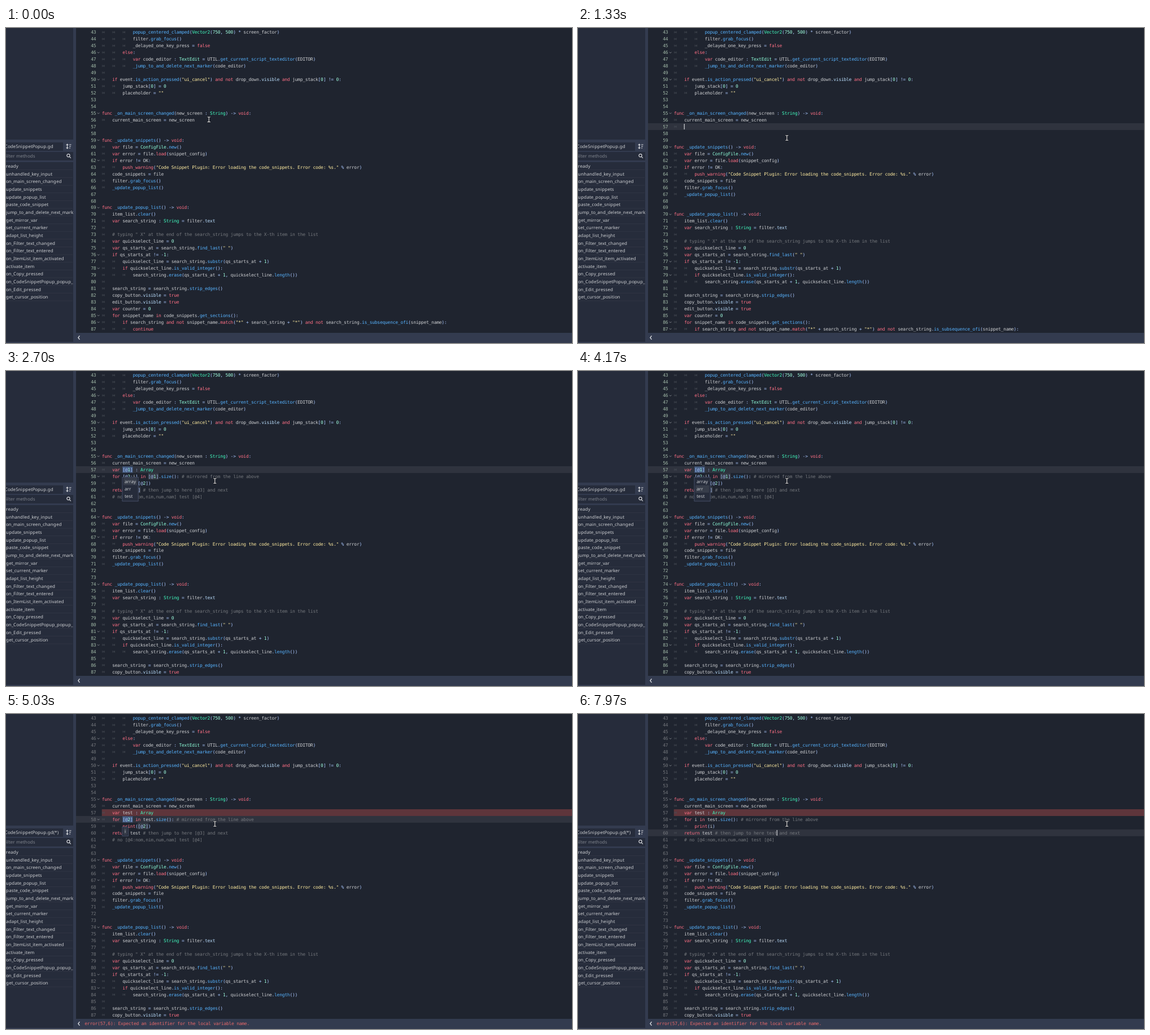
Animation, 1002 px wide and 559 px high, one loop 8 s. Source, as an HTML page with a canvas:

```html
<!DOCTYPE html>
<html lang="en">
<head>
<meta charset="utf-8">
<title>Code snippet popup</title>
<style>
html, body { margin: 0; width: 100%; height: 100%; overflow: hidden; background: #333b4f; }
canvas { display: block; }
</style>
</head>
<body>
<canvas id="stage" width="1002" height="559"></canvas>
<script>
const ctx = document.getElementById('stage').getContext('2d');
const LOOP = 8000;
// The editor is a scaled-down screen: 14px fonts with whole-pixel advances and 21px rows.
const SCALE = .5697;
const MONO = '14px "DejaVu Sans Mono", monospace';
const SANS = '14px "Noto Sans", sans-serif';
const CHAR = 8 * SCALE, ROW = 21 * SCALE, ITEM = 24 * SCALE;
const CODE_X = 169.7, FIRST = 43, LAST = 87;
const C = {
  chrome: '#333b4f', panel: '#262c3b', code: '#1f242f', text: '#cdcfd2', dim: '#75787d',
  safe: '#a3bba9', keyword: '#ff7085', base: '#42ffc2', engine: '#8fffdb', string: '#ffeca1',
  number: '#a1ffe0', symbol: '#abc8ff', func: '#57b3ff', member: '#bce0ff',
  mark: '#4a4f58', border: '#4b556f', accent: '#699ce8', error: '#e8696a'
};

// Each leading ">" is one tab.
const HEAD = `>>>popup_centered_clamped(Vector2(750, 500) * screen_factor)
>>>filter.grab_focus()
>>>_delayed_one_key_press = false
>>else:
>>>var code_editor : TextEdit = UTIL.get_current_script_texteditor(EDITOR)
>>>_jump_to_and_delete_next_marker(code_editor)
>
>if event.is_action_pressed("ui_cancel") and not drop_down.visible and jump_stack[0] != 0:
>>jump_stack[0] = 0
>>placeholder = ""


func _on_main_screen_changed(new_screen : String) -> void:
>current_main_screen = new_screen`.split('\n');
const TAIL = `

func _update_snippets() -> void:
>var file = ConfigFile.new()
>var error = file.load(snippet_config)
>if error != OK:
>>push_warning("Code Snippet Plugin: Error loading the code_snippets. Error code: %s." % error)
>code_snippets = file
>filter.grab_focus()
>_update_popup_list()


func _update_popup_list() -> void:
>item_list.clear()
>var search_string : String = filter.text
>
># typing " X" at the end of the search_string jumps to the X-th item in the list
>var quickselect_line = 0
>var qs_starts_at = search_string.find_last(" ")
>if qs_starts_at != -1:
>>quickselect_line = search_string.substr(qs_starts_at + 1)
>>if quickselect_line.is_valid_integer():
>>>search_string.erase(qs_starts_at + 1, quickselect_line.length())
>
>search_string = search_string.strip_edges()
>copy_button.visible = true
>edit_button.visible = true
>var counter = 0
>for snippet_name in code_snippets.get_sections():
>>if search_string and not snippet_name.match("*" + search_string + "*") and not search_string.is_subsequence_ofi(snippet_name):
>>>continue`.split('\n');

const METHODS = `ready unhandled_key_input on_main_screen_changed update_snippets update_popup_list
paste_code_snippet jump_to_and_delete_next_marker get_mirror_var set_current_marker adapt_list_height
on_Filter_text_changed on_Filter_text_entered on_ItemList_item_activated activate_item on_Copy_pressed
on_CodeSnippetPopup_popup_hide on_Edit_pressed get_cursor_position`.split(/\s+/);

const SNIPPETS = [
  ["---- I'm an just example. ----", "Click the 'Edit' button to see how I work. Feel free to delete me!"],
  ['---- Mirrored/dropdown var example. ----', 'Just another example you can delete.'],
  ['_ready'], ['_enter_tree'], ['_exit_tree'],
  ['_physics_process', ' (delta : float)'], ['_process', ' (delta : float)'],
  ['_input', ' (event : InputEvent)'], ['_unhandled_input', ' (event : InputEvent)'],
  ['_unhandled_key_input', ' (event : InputEventKey)'], ['_gui_input', ' (event : InputEvent)'], ['_draw']
];

const KEYWORDS = new Set('func var if else and not for in return continue true false void push_warning print load match'.split(' '));
const BASE = new Set(['String', 'Vector2', 'Array']);
const ENGINE = new Set(['TextEdit', 'ConfigFile']);

function rect(x, y, w, h, fill, stroke) {
  ctx.fillStyle = fill;
  ctx.fillRect(x, y, w, h);
  if (stroke) {
    ctx.strokeStyle = stroke;
    ctx.lineWidth = .8;
    ctx.strokeRect(x + .4, y + .4, w - .8, h - .8);
  }
}

const advances = new Map();
function advance(ch, font) {
  const key = font + ch;
  if (!advances.has(key)) {
    ctx.font = font;
    advances.set(key, Math.round(ctx.measureText(ch).width));
  }
  return advances.get(key);
}
const textWidth = str => SCALE * [...str].reduce((sum, ch) => sum + advance(ch, SANS), 0);

function text(str, x, y, color, font = SANS) {
  ctx.save();
  ctx.translate(x, y);
  ctx.scale(SCALE, SCALE);
  ctx.fillStyle = color;
  let pen = 0;
  for (const ch of str) {
    const step = advance(ch, font);
    ctx.font = font;
    ctx.fillText(ch, pen, 0);
    pen += step;
  }
  ctx.restore();
}

function path(d, color, width = 1, dx = 0, dy = 0) {
  ctx.save();
  ctx.translate(dx, dy);
  ctx.strokeStyle = color;
  ctx.lineWidth = width;
  ctx.stroke(new Path2D(d));
  ctx.restore();
}
const rowTop = n => 169 + (n - 57) * ROW;
const colX = col => CODE_X + col * CHAR;

function tokenColor(tok, before, after) {
  if (tok[0] === '#') return C.dim;
  if (tok[0] === '"') return C.string;
  if (/^\d/.test(tok)) return C.number;
  if (!/^\w/.test(tok)) return C.symbol;
  if (KEYWORDS.has(tok)) return C.keyword;
  if (BASE.has(tok)) return C.base;
  if (ENGINE.has(tok)) return C.engine;
  if (after === '(') return C.func;
  return before === '.' ? C.member : C.text;
}

const typed = t => 'test'.slice(0, [7400, 7570, 7700, 7970].filter(ms => t >= ms).length);
function snippetLines(t) {
  if (t < 1330) return [];
  if (t < 2700) return ['>'];
  const name = t < 5030 ? '[@1]' : 'test';
  const loopVar = t < 5030 ? '[@2:i]' : t < 6500 ? '[@2]' : 'i';
  const printed = t < 6500 ? '[@2]' : 'i';
  return [
    `>var ${name} : Array`,
    `>for ${loopVar} in ${name}.size(): # mirrored from the line above`,
    `>>print(${printed})`,
    `>return ${name} # then jump to here ${t < 6500 ? '[@3]' : typed(t)} and next`,
    '># no [@4:nom,nim,num,nam] test [@4]'
  ];
}

function drawLine(n, line, t, marker) {
  const y = rowTop(n), base = y + 8.9;
  const tabs = line.match(/^>*/)[0].length;
  const body = line.slice(tabs);
  text(String(n), 150.3, base, t < 4700 ? C.safe : C.dim, MONO);
  if (/^(func|if|else|for)\b/.test(body)) path('M-1.8 -.9L0 .9L1.8 -.9', '#8d9198', .9, 163.6, y + 6.2);
  for (let i = 0; i < tabs; i++)
    path('M.5 -2V2M4 -2V2M.5 0H4M2.2 -1.2L3.6 0L2.2 1.2', C.mark, .6, colX(i * 4) + .4, y + 6);

  const spot = marker ? body.indexOf(marker.text) : -1;
  if (spot >= 0) {
    const x = colX(tabs * 4 + spot), w = marker.text.length * CHAR;
    if (n === marker.line) rect(x, y + .5, w, ROW - 1, 'rgba(105,156,232,.4)');
    else rect(x, y + .5, w, ROW - 1, 'rgba(255,255,255,.09)', 'rgba(255,255,255,.08)');
  }
  for (const m of body.matchAll(/#.*|"[^"]*"|[A-Za-z_]\w*|\d+|[^\s\w]/g)) {
    const color = tokenColor(m[0], body[m.index - 1], body[m.index + m[0].length]);
    text(m[0], colX(tabs * 4 + m.index), base, color, MONO);
  }
}

function drawSidebar(t) {
  rect(0, 0, 119, 198, C.panel);
  rect(0, 203, 101, 15, C.panel);
  rect(0, 220, 119, 15, C.panel);
  rect(0, 238, 119, 319, C.panel);
  ctx.save();
  ctx.beginPath();
  ctx.rect(0, 198, 119, 361);
  ctx.clip();
  text('CodeSnippetPopup.gd' + (t < 4700 ? '' : '(*)'), -2.2, 213.2, C.text);
  text('Filter methods', -3.6, 230.2, '#80858e');
  METHODS.forEach((name, i) => {
    const y = 245 + i * ITEM;
    text('_' + name, -3.4, y + 2.9, C.text);
    rect(0, y + 6.4, 118, .6, 'rgba(255,255,255,.07)');
  });
  ctx.restore();
  path('M-2.5 -4V4M-4.3 -2.2L-2.5 -4L-.7 -2.2M-4.3 2.2L-2.5 4L-.7 2.2M1 -3H4.5M1 0H4M1 3H3', '#d8dade', 1.1, 111, 210);
  path('M2 -.8A2.6 2.6 0 1 1 -3.2 -.8A2.6 2.6 0 1 1 2 -.8M1.2 1.2L3.8 3.8', '#d8dade', 1.2, 111, 227);
}

function drawSnippetPopup(t) {
  const hasText = t >= 2170;
  rect(460, 45, 427, 201, C.chrome, C.border);
  rect(464.5, 50, 366, 14.5, C.panel, C.accent);
  if (hasText) {
    text('1', 469.8, 60.2, C.text);
    path('M-2.6 -2.6L2.6 2.6M2.6 -2.6L-2.6 2.6', '#dfe1e4', 1.2, 822.8, 57.2);
  }
  rect(hasText ? 474.6 : 469.5, 52, .8, 10, '#e0e0e0');
  rect(834, 50, 23, 14.5, C.panel);
  rect(861, 50, 22, 14.5, C.panel);
  text('Copy', 836.3, 60.2, C.text);
  text('Edit', 864.2, 60.2, C.text);
  rect(464, 68, 419, 174, C.panel);
  SNIPPETS.forEach(([name, note], i) => {
    const y = 74.6 + i * ITEM, x = 488.6 + (i > 9 ? 8 * SCALE : 0);
    const width = textWidth(name);
    if (i === (hasText ? 1 : 0)) rect(488, y - 6.4, width + 2, 13, '#4b4f58', '#5b5f68');
    text(`${i}  ::`, 469, y + 2.9, C.text);
    text(name, x, y + 2.9, C.text);
    if (note) text(note, x + width + 3.2, y + 2.9, '#6a6f79');
    rect(466, y + 6.5, 413, .6, 'rgba(255,255,255,.07)');
  });
}

function drawDropdown(items, hovered, top, width) {
  rect(205.5, top, width, items.length * 13.3 + 3.5, C.panel, C.border);
  items.forEach((item, i) => {
    const y = top + 1.5 + i * 13.3;
    if (i === hovered) rect(208, y, width - 5, 13, 'rgba(255,255,255,.08)');
    text(item, 210, y + 9, C.text);
  });
}

function drawCaret(t) {
  let pos = null;
  if (t >= 330 && t < 930) pos = [56, 36];
  else if (t >= 1330 && t < 1970) pos = [57, 4];
  else if (t >= 6500 && (t < 6870 || t >= 7370)) pos = [60, 36 + typed(t).length];
  if (pos) rect(colX(pos[1]) - .3, rowTop(pos[0]) + 1, 1.1, 10, '#e6e7e9');
}

function drawPointer(t) {
  const k = t < 630 ? 0 : t < 730 ? .3 : t < 830 ? .7 : 1;
  const beam = 'M-2.5 -4.3H-.8L0 -3.6L.8 -4.3H2.5M0 -3.6V3.6M-2.5 4.3H-.8L0 3.6L.8 4.3H2.5';
  const x = 359.2 + 10.6 * k, y = 162.3 + 32.7 * k;
  path(beam, '#0c0e12', 2.2, x, y);
  path(beam, '#f2f2f2', 1.1, x, y);
}

function draw(t) {
  rect(0, 0, 1002, 559, C.chrome);
  drawSidebar(t);
  rect(124, 0, 878, 541, C.code);

  const broken = t >= 4700;
  const current = t < 330 ? 0 : t < 1330 ? 56 : t < 5030 ? 57 : t < 6500 ? 58 : 60;
  if (broken) rect(CODE_X, rowTop(57), 1002 - CODE_X, ROW, '#5e353b');
  if (current) rect(124, rowTop(current), 878, ROW, 'rgba(255,255,255,.07)');

  const marker = t < 2700 || t >= 6500 ? null
    : t < 5030 ? { text: '[@1]', line: 57 } : { text: '[@2]', line: 58 };
  const lines = [...HEAD, ...snippetLines(t), ...TAIL];
  for (let n = FIRST; n <= LAST; n++) drawLine(n, lines[n - FIRST], t, marker);
  drawCaret(t);

  path('M1.4 -3.4L-1.2 0L1.4 3.4', '#e0e2e6', 1.3, 129, 549.5);
  if (broken) text('error(57,6): Expected an identifier for the local variable name.', 139.3, 552, C.error, MONO);

  if (t >= 1970 && t < 2700) drawSnippetPopup(t);
  if (t >= 2700 && t < 5030) drawDropdown(['array', 'arr', 'test'], t < 4170 ? 0 : t < 4300 ? 1 : 2, 188, 29);
  if (t >= 5030 && t < 6500) drawDropdown(['i'], 0, 200, 11.5);
  drawPointer(t);
}

ctx.textRendering = 'geometricPrecision';
const start = performance.now();
function frame() {
  draw((performance.now() - start) % LOOP);
  requestAnimationFrame(frame);
}
frame();
</script>
</body>
</html>
```
